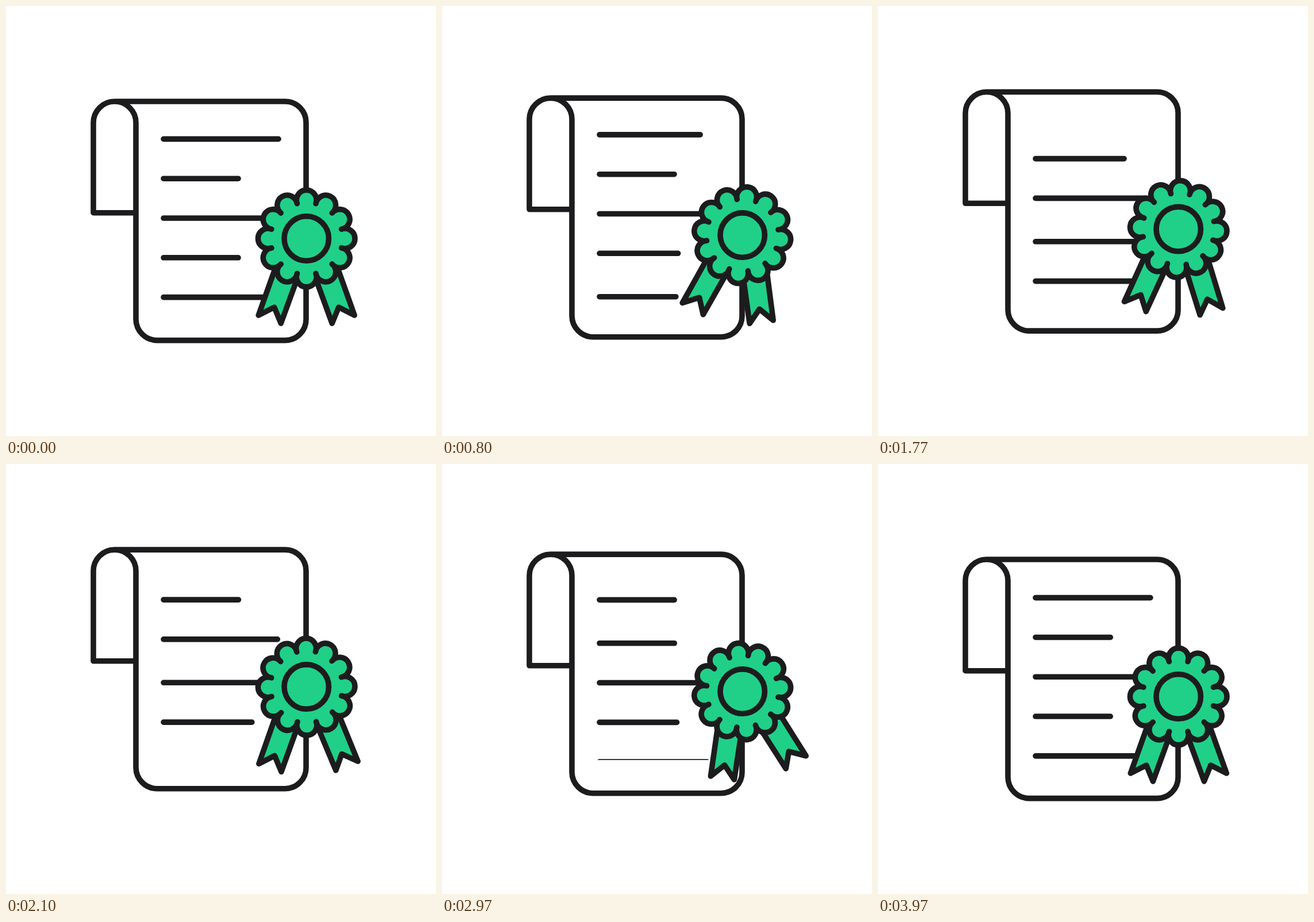
An HTML page that plays this animation: 748 px wide and 748 px high, repeating every 4 s.

```html
<!DOCTYPE html>
<html lang="en">
<head>
<meta charset="utf-8">
<title>Certificate</title>
<style>
  html, body { margin: 0; width: 100%; height: 100%; overflow: hidden; background: #fff; }
  svg { display: block; width: 100vw; height: 100vh; }
  .ink { stroke: #1c1c1e; stroke-width: 9.6; stroke-linecap: round; stroke-linejoin: round; fill: none; }
  .green { fill: #20d088; }
</style>
</head>
<body>
<svg viewBox="0 0 748 748">
  <defs>
    <clipPath id="page"><rect x="240" y="224" width="270" height="300"/></clipPath>
  </defs>
  <g id="all">
    <g class="ink">
      <path d="M189 166H485.500A36.500 36.500 0 0 1 522 202.500V545A36.500 36.500 0 0 1 485.500 581.600H263A37 37 0 0 1 226 545V203A37 37 0 0 0 152 203V359.700H226"/>
      <g id="lines" clip-path="url(#page)"></g>
    </g>
    <g class="ink green" transform="translate(522.700 404.500)">
      <path id="left" d="M-50 39.500L-83.500 133.500L-56 119.500L-44.500 147.500L-6.500 43.500"/>
      <path id="right" d="M50 39.500L83.500 133.500L56 119.500L44.500 147.500L6.500 43.500"/>
      <path id="flower"/>
      <circle r="38.700"/>
    </g>
  </g>
</svg>
<script>
const LOOP = 4000, SPEED = 0.088, SHORT = 404, LONG = 474;
const $ = id => document.getElementById(id);

// Times at which each line is alternately long and short; the first state is given by `long`.
const LINES = [
  { long: 1, at: [0, 900] },
  { long: 0, at: [0, 1350] },
  { long: 1, at: [0, 790, 1820] },
  { long: 0, at: [0, 1200, 2150, 3350] },
  { long: 1, at: [0, 1000, 2000, 3000, 4000] },
  { long: 1, at: [0, 920, 1850, 2930, 4000] },
  { long: 0, at: [800, 1600, 2430, 3300, 4000] },
  { long: 1, at: [1850, 2770, 4000] },
  { long: 0, at: [2400, 3200, 4000] },
  { long: 1, at: [2000, 3000, 4000] }
];
const TILT = [[0, 0], [1000, 7], [3000, -6], [4000, 0]];
const LEFT = [[0, 0], [430, 4.3], [1070, 11.7], [1770, 4.75], [2430, -5.35], [3060, -11.8], [3470, -7.45], [4000, 0]];
const RIGHT = [[0, 0], [430, 6.2], [960, 13], [1770, 2.75], [2430, -7.7], [2950, -12.6], [3470, -6.45], [4000, 0]];

function segment(keys, t) {
  let i = 0;
  while (i < keys.length - 2 && t >= keys[i + 1][0]) i++;
  const [t0, a] = keys[i], [t1, b] = keys[i + 1];
  const u = Math.min(1, Math.max(0, (t - t0) / (t1 - t0)));
  return { i, a, b, u, span: t1 - t0 };
}

// Ease in and out between keys.
function ease(keys, t) {
  const { a, b, u } = segment(keys, t);
  return a + (b - a) * (1 - Math.cos(Math.PI * u)) / 2;
}

// Smooth curve through the keys, at rest at both ends.
function curve(keys, t) {
  const { i, a, b, u, span } = segment(keys, t);
  const slope = k => k === 0 || k === keys.length - 1 ? 0
    : (keys[k + 1][1] - keys[k - 1][1]) / (keys[k + 1][0] - keys[k - 1][0]);
  const v = 1 - u;
  return a * v * v * (1 + 2 * u) + b * u * u * (1 + 2 * v)
    + span * u * v * (slope(i) * v - slope(i + 1) * u);
}

function flowerPath(petals, r, bend) {
  let d = "";
  for (let k = 0; k <= petals; k++) {
    const a = (k + 0.5) * 2 * Math.PI / petals;
    const p = (r * Math.cos(a)).toFixed(2) + " " + (r * Math.sin(a)).toFixed(2);
    d += k ? `A${bend} ${bend} 0 1 1 ${p}` : "M" + p;
  }
  return d + "Z";
}
$("flower").setAttribute("d", flowerPath(12, 63, 17.4));

const lines = LINES.map(({ long, at }, i) => {
  const el = document.createElementNS("http://www.w3.org/2000/svg", "path");
  $("lines").append(el);
  return {
    el,
    y: 231.5 + 68.8 * i + (i > 4 ? 6.6 : 0),
    keys: at.map((t, k) => [t, (k + long) % 2 ? LONG : SHORT])
  };
});

const turn = (id, deg) => $(id).setAttribute("transform", `rotate(${deg.toFixed(3)})`);

function draw(t) {
  const rise = 8.5 * (1 - Math.cos(2 * Math.PI * t / LOOP));
  $("all").setAttribute("transform", `translate(0 ${(-rise).toFixed(3)})`);
  for (const { el, y, keys } of lines) {
    el.setAttribute("d", `M274 ${(y - SPEED * t).toFixed(2)}H${ease(keys, t).toFixed(2)}`);
  }
  turn("flower", ease(TILT, t));
  turn("left", curve(LEFT, t));
  turn("right", curve(RIGHT, t));
}

const start = performance.now();
function tick() {
  draw((performance.now() - start) % LOOP);
  requestAnimationFrame(tick);
}
tick();
</script>
</body>
</html>
```
